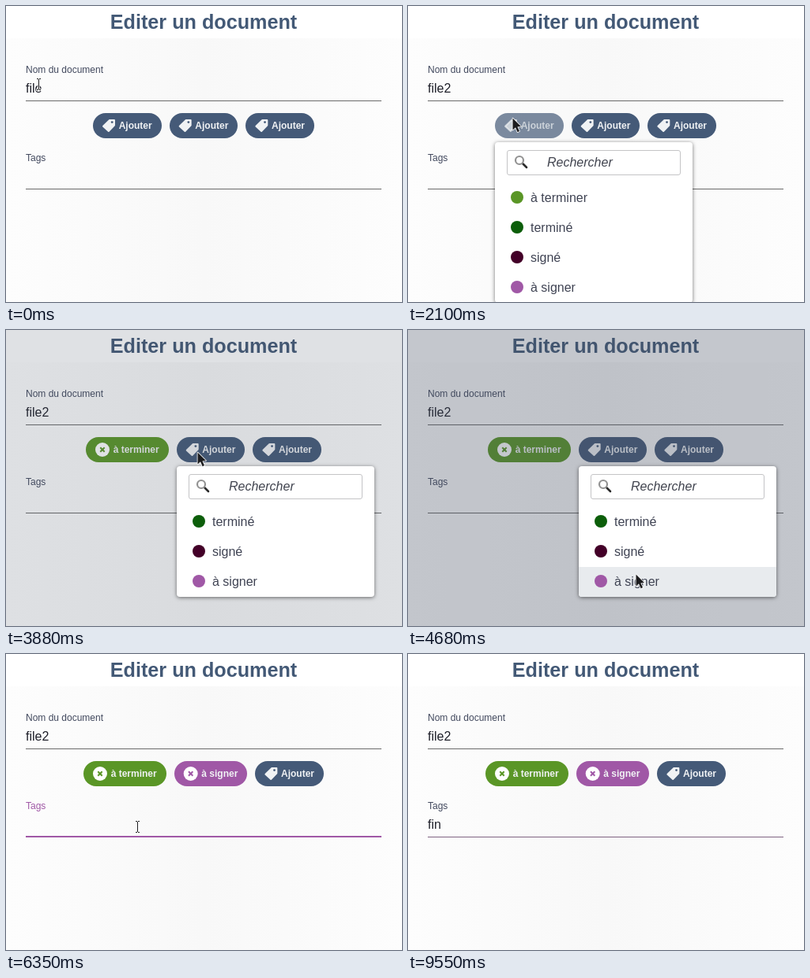
Recreate the animation shown at these times as an HTML page with a canvas. Size 501x376 px, loop 9570 ms.

```html
<!DOCTYPE html>
<html lang="fr">
<head>
<meta charset="utf-8">
<title>Editer un document</title>
<style>
html, body { margin: 0; width: 100%; height: 100%; overflow: hidden; background: #fff; }
canvas { display: block; }
</style>
</head>
<body>
<canvas id="stage" width="501" height="376"></canvas>
<script>
const ctx = document.getElementById('stage').getContext('2d');
const W = 501, H = 376, LOOP = 9570;
const FONT = '"Liberation Sans", Arial, sans-serif';

const BLUE = '#455a78', LABEL = [66, 73, 94], LINE = [106, 106, 106], ACCENT = [160, 88, 166];
const TAGS = {
  todo: ['à terminer', '#5a9626'],
  done: ['terminé', '#0c5e0a'],
  signed: ['signé', '#430028'],
  sign: ['à signer', '#a058a6']
};

// Pointer keys: time, x, y
const POINTER = [
  [0, 41, 99], [1430, 41, 99], [1880, 132, 142], [2370, 132, 142],
  [2880, 192, 240], [3130, 192, 240], [3640, 242, 155], [3980, 242, 155],
  [4480, 288, 310], [4860, 288, 310], [5580, 166, 219], [7600, 166, 219],
  [7730, 169, 219], [8060, 169, 219], [8230, 174, 225], [8430, 174, 225],
  [8530, 179, 225], [8690, 179, 225], [9130, 188, -20]
];
// Pill hover: pill index, start, end
const HOVERS = [[0, 1790, 2130], [1, 3560, 3770], [0, 8860, 8930]];
// Popups: anchor pill, open, dim start, close, items
const POPUPS = [
  [0, 2080, 2110, 3030, ['todo', 'done', 'signed', 'sign']],
  [1, 3750, 3765, 4730, ['done', 'signed', 'sign']]
];

const clamp = v => Math.max(0, Math.min(1, v));
const ramp = (t, start, len) => clamp((t - start) / len);
const mix = (a, b, k) => `rgb(${a.map((v, i) => Math.round(v + (b[i] - v) * k))})`;

function rect(x, y, w, h, color) {
  ctx.fillStyle = color;
  ctx.fillRect(x, y, w, h);
}

function round(x, y, w, h, r) {
  ctx.beginPath();
  ctx.roundRect(x, y, w, h, r);
}

function disc(x, y, r, color) {
  ctx.beginPath();
  ctx.arc(x, y, r, 0, 7);
  ctx.fillStyle = color;
  ctx.fill();
}

function lines(points, closed) {
  ctx.beginPath();
  for (const [x, y] of points) ctx.lineTo(x, y);
  if (closed) ctx.closePath();
}

function text(str, x, y, size, color, style = '') {
  ctx.font = `${style} ${size}px ${FONT}`;
  ctx.fillStyle = color;
  ctx.fillText(str, x, y);
}

function pointerAt(t) {
  let i = 0;
  while (i < POINTER.length - 2 && t >= POINTER[i + 1][0]) i++;
  const [t0, x0, y0] = POINTER[i], [t1, x1, y1] = POINTER[i + 1];
  let k = ramp(t, t0, t1 - t0);
  k = k * k * (3 - 2 * k);
  return [Math.round(x0 + (x1 - x0) * k), Math.round(y0 + (y1 - y0) * k)];
}

function page() {
  rect(0, 0, W, H, '#fff');
  const g = ctx.createLinearGradient(0, 0, W, 0);
  g.addColorStop(0, '#fdfdfd');
  g.addColorStop(0.5, '#f8f8f8');
  g.addColorStop(1, '#fdfdfd');
  rect(0, 41, W, H - 41, g);
  ctx.textAlign = 'center';
  text('Editer un document', 250, 29, 25.2, '#435976', 'bold');
  ctx.textAlign = 'left';
}

function field(label, value, y, focus, caretX) {
  text(label, 25, y - 35, 12, mix(LABEL, ACCENT, clamp(focus * 2 - 1)));
  text(value, 25, y - 10, 16, '#1e1f29');
  const thick = focus > 0.5 ? 2 : 1;
  rect(25, y + 1 - thick, 450, thick, mix(LINE, ACCENT, focus));
  if (caretX) rect(caretX, y - 24, 1, 17, '#1e1f29');
}

function tagIcon(x, hole) {
  const p = [[9, 1], [15, 1], [15, 7.5], [7.8, 15], [1, 8.8]].map(([a, b]) => [x + a, 144 + b]);
  lines(p, true);
  ctx.fillStyle = ctx.strokeStyle = '#f0f2f4';
  ctx.lineWidth = 2;
  ctx.lineJoin = 'round';
  ctx.fill();
  ctx.stroke();
  disc(x + 12.2, 147.6, 1.4, hole);
}

function closeIcon(x, color) {
  disc(x + 9, 152, 9, '#fff');
  ctx.strokeStyle = color;
  ctx.lineWidth = 2;
  for (const s of [-1, 1]) {
    lines([[x + 6.3, 152 - 2.7 * s], [x + 11.7, 152 + 2.7 * s]]);
    ctx.stroke();
  }
}

function layoutPills(t) {
  const ids = [t >= 3030 && 'todo', t >= 4730 && 'sign', null];
  ctx.font = `bold 12px ${FONT}`;
  const pills = ids.map(id => {
    const [name, color] = id ? TAGS[id] : ['Ajouter', BLUE];
    const textX = 12 + (id ? 18 : 16) + 4.67;
    return { id, name, color, textX, w: textX + ctx.measureText(name).width + 12 };
  });
  let x = 250 - (pills.reduce((s, p) => s + p.w, 0) + 20) / 2;
  for (const p of pills) {
    p.x = x;
    x += p.w + 10;
  }
  return pills;
}

function drawPill(p, hover) {
  const left = Math.round(p.x);
  ctx.globalAlpha = 1 - 0.3 * hover;
  round(left, 136, Math.round(p.x + p.w) - left, 32, 16);
  ctx.fillStyle = p.color;
  ctx.fill();
  if (p.id) closeIcon(p.x + 12, p.color);
  else tagIcon(p.x + 12, p.color);
  text(p.name, p.x + p.textX, 156, 12, '#f0f2f4', 'bold');
  ctx.globalAlpha = 1;
}

function popup(x, items, my) {
  const h = 52 + 38 * items.length;
  round(x, 173, 250, h, 4);
  ctx.save();
  ctx.shadowColor = 'rgba(0,0,0,.55)';
  ctx.shadowBlur = 5;
  ctx.shadowOffsetY = 1;
  ctx.fillStyle = '#fff';
  ctx.fill();
  ctx.restore();

  ctx.save();
  ctx.clip();
  const row = Math.floor((my - 225) / 38);
  if (row >= 0) rect(x, 225 + row * 38, 250, 38, '#e8ebee');
  ctx.restore();

  round(x + 15.5, 183.5, 219, 31, 2.5);
  ctx.strokeStyle = '#c4c4c6';
  ctx.lineWidth = 1;
  ctx.stroke();
  searchIcon(x + 31, 196);
  text('Rechercher', x + 66, 204, 16, '#41444f', 'italic');
  items.forEach((id, i) => {
    const [name, color] = TAGS[id], y = 243 + 38 * i;
    disc(x + 28, y, 8, color);
    text(name, x + 45, y + 6, 16, '#3f4353');
  });
}

function searchIcon(x, y) {
  ctx.lineCap = 'round';
  ctx.lineWidth = 2.6;
  ctx.strokeStyle = '#2a2a2a';
  lines([[x + 4.5, y + 4.5], [x + 9, y + 9]]);
  ctx.stroke();
  ctx.lineCap = 'butt';
  ctx.beginPath();
  ctx.arc(x, y, 5, 0, 7);
  ctx.lineWidth = 2.2;
  ctx.strokeStyle = '#929292';
  ctx.stroke();
}

function arrow(x, y) {
  const p = [[0.5, 0.5], [0.5, 15.5], [4, 12.3], [6.6, 18.2], [9, 17.1], [6.4, 11.4], [11, 11]];
  lines(p.map(([a, b]) => [x + a, y + b]), true);
  ctx.lineJoin = 'round';
  ctx.lineWidth = 1.6;
  ctx.strokeStyle = '#fff';
  ctx.stroke();
  ctx.fillStyle = '#1c1c1e';
  ctx.fill();
}

function beam(x, y) {
  const bars = [[-2, -7, 2, 1], [1, -7, 2, 1], [0, -6, 1, 13], [-2, 7, 2, 1], [1, 7, 2, 1]];
  for (const [a, b, w, h] of bars) rect(x + a - 1, y + b - 1, w + 2, h + 2, 'rgba(255,255,255,.75)');
  for (const [a, b, w, h] of bars) rect(x + a, y + b, w, h, '#1c1c1e');
}

function nameField(t) {
  const focus = ramp(t, 120, 200) - ramp(t, 1900, 180);
  const typed = t >= 1380;
  const on = t >= 130 && t < 1900 && (t < 630 || t >= 1130);
  field('Nom du document', typed ? 'file2' : 'file', 120, focus, on && (typed ? 54 : 45));
}

function tagField(t) {
  const focus = ramp(t, 5710, 170) - ramp(t, 9460, 150);
  const count = [7050, 8080, 8450].filter(k => t >= k).length;
  const on = [[5730, 6350], [6930, 7630], [8080, 8980]].some(([a, b]) => t >= a && t < b);
  field('Tags', 'fin'.slice(0, count), 232, focus, on && [25, 29, 33, 41][count]);
}

function draw(t) {
  const [mx, my] = pointerAt(t);
  page();
  nameField(t);
  tagField(t);

  const pills = layoutPills(t);
  pills.forEach((p, i) => {
    const hover = HOVERS.filter(h => h[0] === i)
      .reduce((k, h) => Math.max(k, ramp(t, h[1], 100) - ramp(t, h[2], 100)), 0);
    drawPill(p, hover);
  });

  const open = POPUPS.find(p => t >= p[1] && t < p[3]);
  if (open) {
    rect(0, 0, W, H, `rgba(66,76,94,${0.31 * ramp(t, open[2], 215)})`);
    popup(Math.round(pills[open[0]].x), open[4], my);
  }

  const inField = [92, 204].some(y => my >= y && my < y + 29);
  if (!open && inField) beam(mx, my);
  else arrow(mx, my);
}

function tick(now) {
  draw(now % LOOP);
  requestAnimationFrame(tick);
}
requestAnimationFrame(tick);
</script>
</body>
</html>
```
